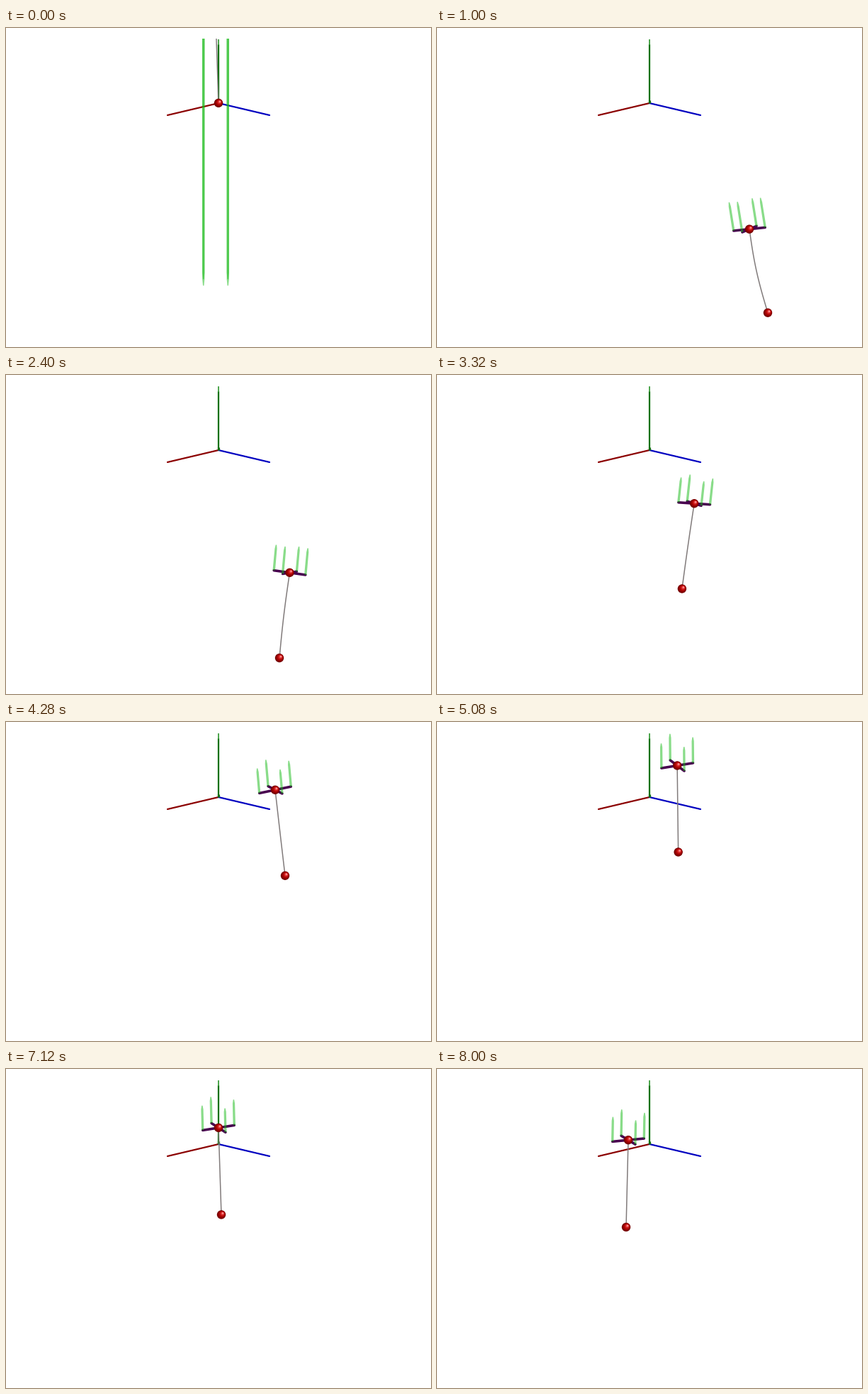
Animation, 600 px wide and 450 px high, one loop 8040 ms. Source, as a matplotlib script:

```python
import numpy as np
import matplotlib.pyplot as plt
from matplotlib.animation import FuncAnimation
from matplotlib.patches import Circle, Polygon

W, H, DPI = 600, 450, 100
TOP, BOTTOM = 15, 435          # visible band of the viewport
FRAMES, STEP = 201, 40
PX = 72 / DPI                  # one pixel in points
HORIZON, ARM = 225, 24.4

# key points: time, load x, sideways lead of the load over the drone
SWAY = np.array([
    [0, 300, 4], [.3, 305, 14], [1, 467, 26], [1.5, 536, 31],
    [2.4, 386, -14.5], [2.8, 342, -31], [3.36, 347, -16], [4.28, 394, 14],
    [5.04, 343, 2], [5.88, 301, -6], [7.12, 304, 4], [8, 267, -3]])


def spline(keys, t):
    """Cubic Hermite curve through rows of (time, values...)."""
    time, vals = keys[:, 0], keys[:, 1:]
    slope = np.gradient(vals, time, axis=0)
    i = int(np.clip(np.searchsorted(time, t, side="right") - 1, 0, len(time) - 2))
    h = time[i + 1] - time[i]
    u = (t - time[i]) / h
    return ((1 + 2 * u) * (1 - u) ** 2 * vals[i] + u * (1 - u) ** 2 * h * slope[i]
            + u * u * (3 - 2 * u) * vals[i + 1] + u * u * (u - 1) * h * slope[i + 1])


def load_height(t):
    """Damped spring about its rest height, plus the jolt of the start."""
    tau, w, k = t - 1.66, .8076, .397
    spring = np.exp(-k * tau) * (np.cos(w * tau) + k / w * np.sin(w * tau))
    return 224 + 211 * spring + (90 * t - 16) * np.exp(-2 * t)


def state(t):
    """Positions of drone and load, the four arm tips and their thrusts."""
    x, lead = spline(SWAY, t)
    load = np.array([x, load_height(t)])
    drone = load - [lead, np.sqrt((120.5 + .3 * t) ** 2 - lead ** 2)]
    settle = 1 - np.exp(-4 * t)
    yaw = np.radians(45 - 21 * settle)
    c, s = np.cos(yaw), np.sin(yaw)
    pitch = .0021 * (HORIZON - drone[1])
    tilt = -.00625 * lead * settle
    a = ARM * np.array([c, c * tilt - s * pitch])
    b = ARM * np.array([s, s * tilt + c * pitch])
    size = 35.5 + 15 * np.exp(-t) - 424 * np.exp(-10 * t)
    up = size * np.array([tilt, -1])
    # nearer arrows look longer
    rotors = [(v, up * (1 + .05 * depth))
              for v, depth in ((-a, -s), (-b, c), (b, -c), (a, s))]
    return drone, load, rotors


fig = plt.figure(figsize=(W / DPI, H / DPI), dpi=DPI, facecolor="white")
ax = fig.add_axes([0, (H - BOTTOM) / H, 1, (BOTTOM - TOP) / H])
ax.set(xlim=(0, W), ylim=(BOTTOM, TOP))
ax.axis("off")


def line(color, width, z, pts=((0, 0), (0, 0)), cap="butt", **kw):
    return ax.plot(*zip(*pts), color=color, lw=width * PX, zorder=z,
                   solid_capstyle=cap, **kw)[0]


class Ball:
    """Sphere shaded by discs that shrink towards the highlight."""

    def __init__(self, z, n=7):
        self.discs = []
        for u in np.linspace(0, 1, n):
            color = (.45 + .55 * u, .6 * u ** 4, .6 * u ** 4)
            disc = ax.add_patch(Circle((0, 0), 6.2 - 5.1 * u, color=color, lw=0, zorder=z))
            self.discs.append((disc, 2 * u))

    def move(self, p):
        for disc, shift in self.discs:
            disc.center = p[0] + shift, p[1] - shift


class Arrow:
    def __init__(self):
        self.body = ax.add_patch(Polygon([(0, 0)] * 3, fc=(.08, .73, .08, .5),
                                         lw=0, zorder=6))

    def move(self, base, vec):
        size = np.hypot(*vec) + 1e-9
        d = vec / size
        n = np.array([-d[1], d[0]])
        tip = base + vec
        neck = tip - d * min(9, size * .15)
        self.body.set_xy([base + 1.7 * n, neck + 1.6 * n, tip + .7 * n,
                          tip - .7 * n, neck - 1.6 * n, base - 1.7 * n])


# fixed coordinate axes
ORIGIN = (300, 106)
line("#8b0000", 2.2, 1, [ORIGIN, (228, 123)], "round")
line("#0000c0", 2.2, 1, [ORIGIN, (372, 123)], "round")
line("#007000", 2.2, 1, [ORIGIN, (300, 23)])
line("#3c9c3c", 1.8, 1, [(300, 24), (300, 16)])
line("#107010", 3.2, 1, [ORIGIN, (300, 102)])

cable = line("#807a7a", 1.5, 3)
arms = [line("#48004f", 3.6, 4, cap="round") for _ in range(2)]
arrows = [Arrow() for _ in range(4)]
drone_ball, load_ball = Ball(7), Ball(8)
S = np.linspace(0, 1, 25)


def update(k):
    t = k * STEP / 1000
    drone, load, rotors = state(t)
    bend = -22 * t * t * np.exp(-2 * t)
    cable.set_data(drone[0] + (load[0] - drone[0]) * S + bend * np.sin(np.pi * S),
                   drone[1] + (load[1] - drone[1]) * S)
    for arm, (v, _) in zip(arms, rotors):
        arm.set_data(*zip(drone + v, drone - v))
    for arrow, (v, force) in zip(arrows, rotors):
        arrow.move(drone + v, force)
    drone_ball.move(drone)
    load_ball.move(load)
    return []


anim = FuncAnimation(fig, update, frames=FRAMES, interval=STEP,
                     repeat=True, repeat_delay=0, blit=False)
plt.show()
```
